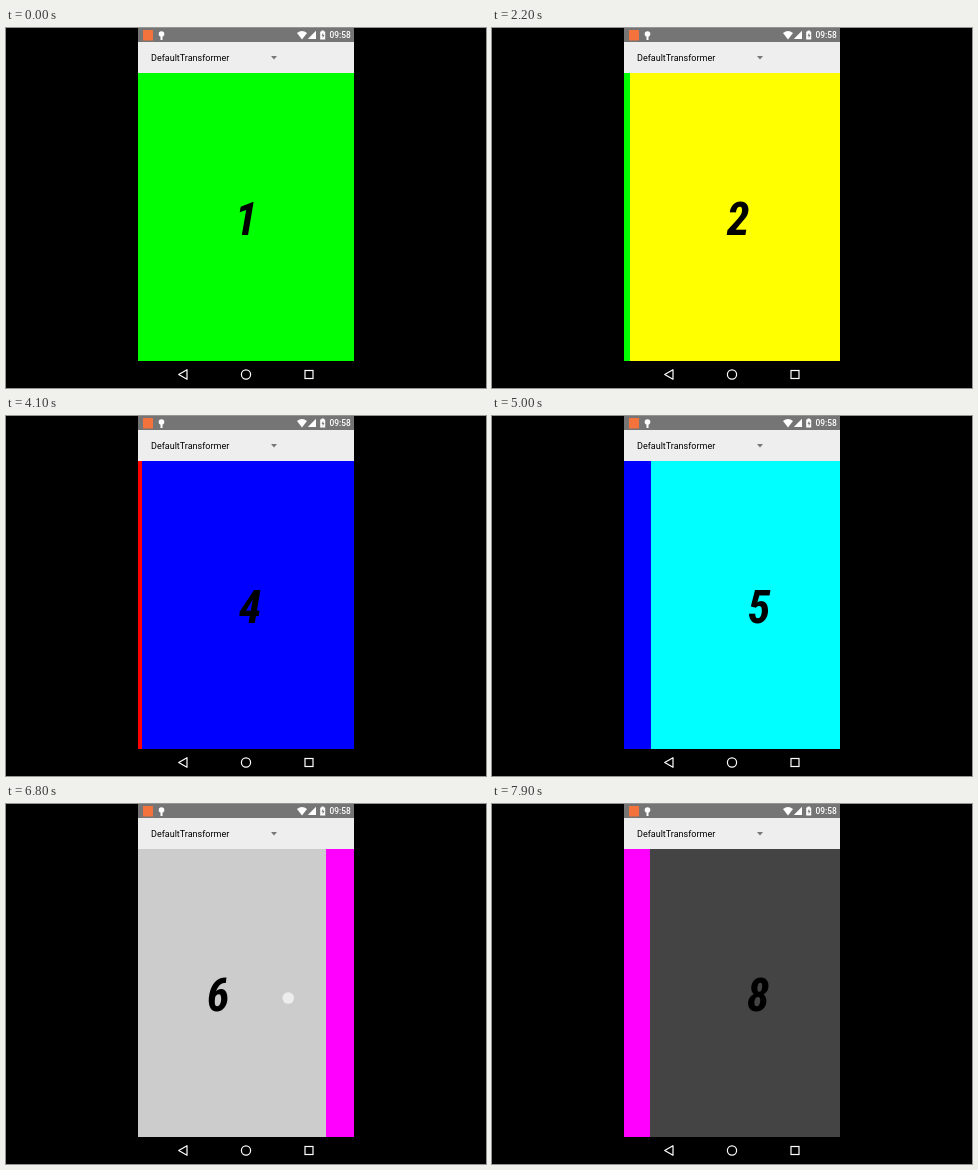
Recreate the animation shown at these times as an HTML page. Size 480x360 px, loop 8000 ms.

```html
<!DOCTYPE html>
<html lang="en">
<head>
<meta charset="utf-8">
<title>Pager</title>
<style>
  html, body { margin: 0; width: 100%; height: 100%; overflow: hidden; background: #000; }
  svg { display: block; width: 480px; height: 360px; }
  text { font-family: Roboto, sans-serif; }
  .num {
    font: italic 700 46px "Roboto Condensed", Roboto, sans-serif;
    font-stretch: condensed;
    text-anchor: middle;
  }
  .clock { font-size: 8.4px; font-weight: 500; fill: #fff; }
  .title { font-size: 9px; }
  .nav { fill: none; stroke: #fff; stroke-width: 1.2; }
</style>
</head>
<body>
<svg viewBox="0 0 480 360">
  <defs><clipPath id="view"><rect x="132" y="45" width="216" height="288"/></clipPath></defs>
  <g clip-path="url(#view)">
    <g id="strip"></g>
    <circle id="dot" r="5.8" fill="#fff" fill-opacity=".65"/>
  </g>

  <rect x="132" width="216" height="14" fill="#757575"/>
  <rect x="137" y="2" width="10" height="10.5" fill="#f4733c"/>
  <g fill="#fff">
    <circle cx="155.5" cy="6" r="2.8"/>
    <rect x="154.5" y="8" width="2" height="4"/>
    <path d="M291 5q5-4 10 0l-5 6.500z"/>
    <path d="M310 2.800v8.200h-8.200z"/>
    <path d="M314.200 3.500h1.300v-1h2.400v1h1.300v8h-5z"/>
  </g>
  <path d="M317.300 4.700l-1.800 3h1.200v2.500l1.700-3.200h-1.100z" fill="#757575"/>
  <text class="clock" x="323.500" y="10.300">09:58</text>

  <rect x="132" y="14" width="216" height="31" fill="#eee"/>
  <text class="title" x="145" y="33">DefaultTransformer</text>
  <path d="M265 28h6l-3 3.400z" fill="#777"/>

  <g class="nav">
    <path d="M181 341.700v9.600l-8.300-4.800z" stroke-linejoin="round"/>
    <circle cx="240" cy="346.500" r="4.600"/>
    <rect x="299" y="342.500" width="8" height="8"/>
  </g>
</svg>
<script>
  const LOOP = 8000, STEP = 100, WIDTH = 216;
  const SETTLE = 560, TRAVEL = 60, SLOP = 9;
  const colors = ['#0f0', '#ff0', '#f00', '#00f', '#0ff', '#ccc', '#f0f', '#444'];
  // Finger down and finger up, in ms
  const swipes = [
    [1800, 1929], [2640, 2715], [3500, 3806], [4700, 4830],
    [5900, 6080], [6710, 6825], [7600, 7727]
  ];
  const strip = document.getElementById('strip');
  const dot = document.getElementById('dot');

  strip.innerHTML = colors.map((color, i) => {
    const x = 132 + i * WIDTH;
    return `<rect x="${x}" y="45" width="${WIDTH}" height="288" fill="${color}"/>` +
      `<text class="num" x="${x + WIDTH / 2}" y="207">${i + 1}</text>`;
  }).join('');

  const fingerTravel = (t, down, up) => TRAVEL * ((t - down) / (up - down)) ** 2;

  function pageShift(t, [down, up]) {
    if (t <= down) return 0;
    if (t < up) return Math.max(0, fingerTravel(t, down, up) - SLOP);
    const rest = Math.max(0, 1 - (t - up) / SETTLE);
    return WIDTH - (WIDTH - TRAVEL + SLOP) * rest ** 5;
  }

  function draw() {
    const t = Math.floor(performance.now() % LOOP / STEP) * STEP;
    const shift = swipes.reduce((sum, swipe) => sum + pageShift(t, swipe), 0);
    strip.setAttribute('transform', `translate(${-Math.round(shift)})`);

    const touch = swipes.find(([down, up]) => t >= down && t < up);
    dot.setAttribute('visibility', touch ? 'visible' : 'hidden');
    if (touch) {
      const d = fingerTravel(t, ...touch);
      dot.setAttribute('cx', 319 - d);
      dot.setAttribute('cy', 184.5 + d * 0.26);
    }
    requestAnimationFrame(draw);
  }
  draw();
</script>
</body>
</html>
```
